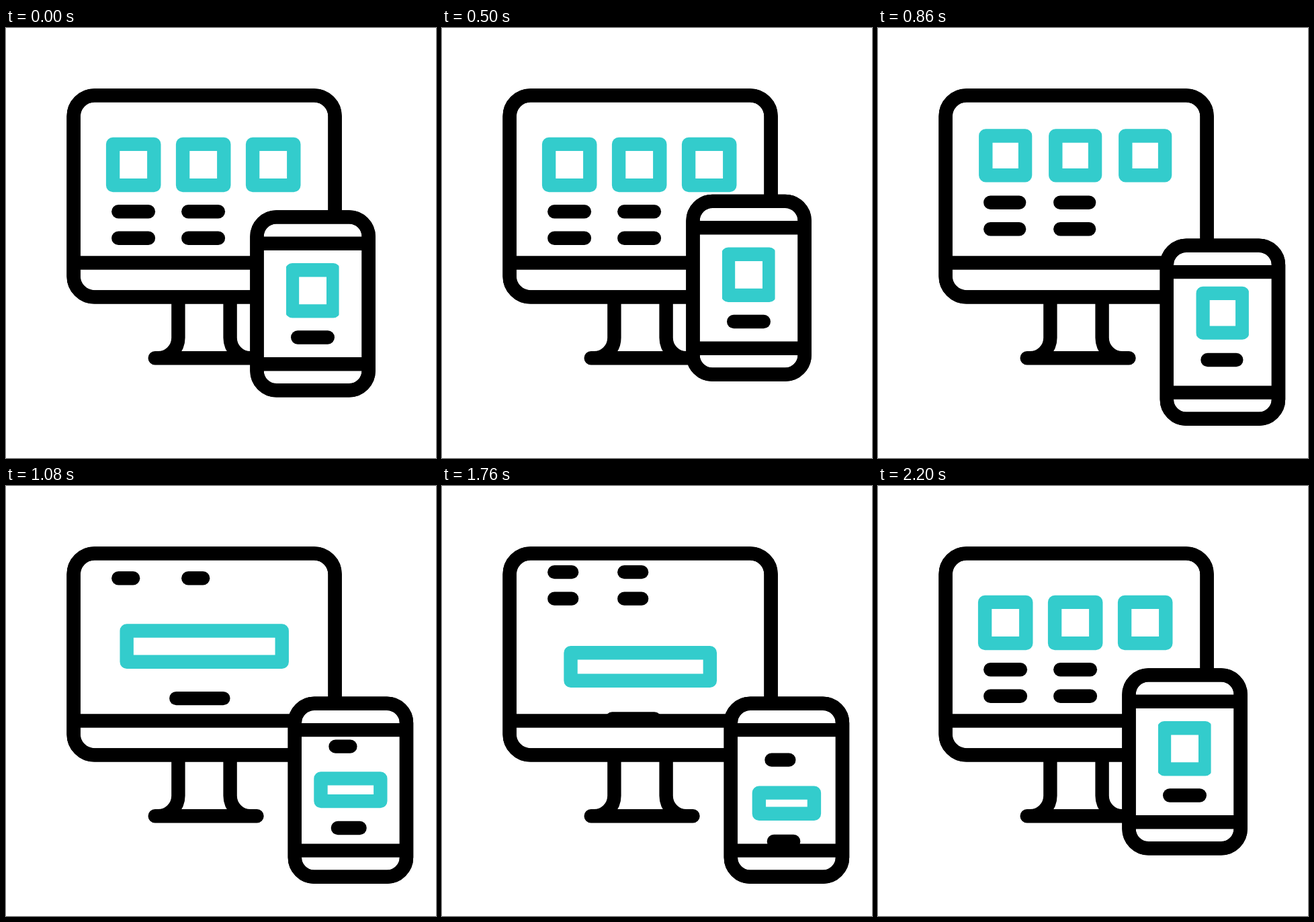
Write an HTML page that moves like this. It is 640 px wide and 640 px high and loops after 2400 ms.

```html
<!DOCTYPE html>
<html lang="en">
<head>
<meta charset="utf-8">
<title>Responsive layout</title>
<style>
  html, body { margin: 0; width: 100%; height: 100%; overflow: hidden; background: #fff; }
  svg { display: block; width: 100%; height: 100%; }
  svg * { fill: none; stroke: #000; stroke-width: 20.4; stroke-linecap: round; stroke-linejoin: round; }
  .case { fill: #fff; }
  .bar { stroke-linecap: butt; }
  .tile { stroke: #33cccc; stroke-linejoin: round; }
</style>
</head>
<body>
<svg viewBox="0 0 640 640">
  <defs>
    <clipPath id="screenClip"><rect x="105" y="105" width="380" height="240"/></clipPath>
    <clipPath id="phoneClip"><rect x="378" y="326" width="157" height="170"/></clipPath>
    <clipPath id="tileClip"><rect x="417" y="200" width="78.6" height="400"/></clipPath>
  </defs>
  <path d="M256.4 400V461A30.3 30.3 0 0 1 226 491.3M333.6 400V461A30.3 30.3 0 0 0 364 491.3M221.7 491.3H373.5"/>
  <rect class="case" x="100.6" y="100.4" width="389" height="300" rx="31"/>
  <g id="screen" clip-path="url(#screenClip)"></g>
  <path class="bar" d="M100.6 349.5H489.6"/>
  <rect x="100.6" y="100.4" width="389" height="300" rx="31"/>
  <g id="phone">
    <rect class="case" x="373.5" y="281.4" width="166.2" height="257.9" rx="29"/>
    <g id="phoneScreen" clip-path="url(#phoneClip)"></g>
    <path class="bar" d="M373.5 320.7H539.7M373.5 500.2H539.7"/>
    <rect x="373.5" y="281.4" width="166.2" height="257.9" rx="29"/>
  </g>
</svg>
<script>
  const LOOP = 2400, STEP = 20, SMALL = 0.35;
  const $ = id => document.getElementById(id);
  const phone = $('phone');

  function add(parent, name, attrs = {}) {
    const el = document.createElementNS('http://www.w3.org/2000/svg', name);
    for (const key in attrs) el.setAttribute(key, attrs[key]);
    return parent.appendChild(el);
  }

  // Each part returns a function that redraws it at a given size.
  function tile(parent, cx, cy, w, h, least = SMALL, attrs = {}) {
    const el = add(add(parent, 'g', attrs), 'path', { class: 'tile' });
    return k => {
      const s = least + (1 - least) * k, x = w * s / 2, y = h * s / 2;
      el.setAttribute('d', `M${cx - x} ${cy - y}H${cx + x}V${cy + y}H${cx - x}Z`);
    };
  }

  function line(parent, x, y, length, least = 1) {
    const el = add(parent, 'path');
    return (k, trim) => {
      const s = (SMALL + (1 - SMALL) * k) * (1 - trim * (1 - least));
      el.setAttribute('d', `M${x} ${y}H${x + length * s}`);
    };
  }

  function page(parent, build) {
    const group = add(parent, 'g');
    const parts = build(group);
    return (y, k, trim) => {
      group.setAttribute('transform', `translate(0 ${y})`);
      parts.forEach(draw => draw(k, trim));
    };
  }

  const screenGrid = page($('screen'), g => [
    ...[189.7, 293.7, 397.7].map(x => tile(g, x, 203.5, 61.2, 61.2)),
    ...[167.3, 271.3].flatMap(x => [273.3, 312.8].map(y => line(g, x, y, 44.6)))
  ]);
  const screenBanner = page($('screen'), g => [
    tile(g, 295.2, 190.2, 268.8, 53.8),
    line(g, 253.3, 267.7, 81.5, 0.2),
    line(g, 221.6, 308.4, 147, 0.32)
  ]);
  const phoneGrid = page($('phoneScreen'), g => [
    tile(g, 456.6, 390.8, 61.2, 61.2, SMALL, { 'clip-path': 'url(#tileClip)' }),
    line(g, 434.2, 460.5, 44.6)
  ]);
  const phoneBanner = page($('phoneScreen'), g => [
    tile(g, 456.6, 378.1, 99.6, 37.8, 0.5),
    line(g, 437.6, 434.8, 38, 0.35),
    line(g, 437.6, 473.1, 38, 0.35)
  ]);

  function ramp(t, from, to) {
    const p = Math.min(1, Math.max(0, (t - from) / (to - from)));
    return p * p * (3 - 2 * p);
  }
  const pulse = (t, a, b, c, d) => ramp(t, a, b) - ramp(t, c, d);

  function render(t) {
    const hop = pulse(t, 200, 400, 400, 600);
    const shift = pulse(t, 600, 800, 2000, 2200);
    const scroll = pulse(t, 800, 1200, 1600, 2000);
    const trim = pulse(t, 1200, 1400, 1400, 1600);

    phone.setAttribute('transform', `translate(${56.3 * shift} ${42.4 * shift - 47 * hop})`);
    screenGrid(-224 * scroll, 1 - scroll, 0);
    screenBanner(224 * (1 - scroll), scroll, trim);
    phoneGrid(-147 * scroll, 1 - scroll, 0);
    phoneBanner(147 * (1 - scroll), scroll, trim);
  }

  const start = performance.now();
  function tick() {
    const t = (performance.now() - start) % LOOP;
    render(Math.floor(t / STEP) * STEP);
    requestAnimationFrame(tick);
  }
  tick();
</script>
</body>
</html>
```
